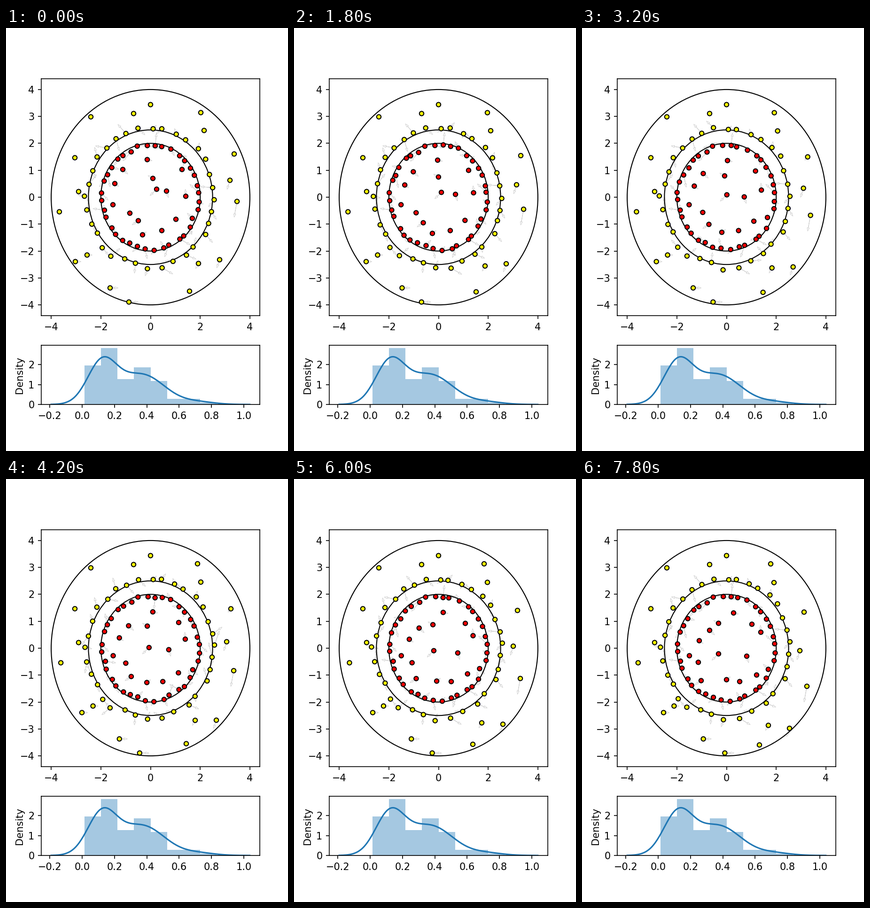
A matplotlib script for the animation above (8 s loop, 600x900 px).

```python
import numpy as np
import matplotlib.pyplot as plt
from matplotlib.animation import FuncAnimation
from matplotlib.collections import PolyCollection

FRAMES = 40
STEP = 0.055          # arrows show displacement per frame / STEP
UNIT = np.array([465 / 8.8, -504 / 8.8])   # pixels per data unit
rng = np.random.default_rng(4)


def ring(n, first, radius, spread):
    """Evenly spaced cells, pressed loosely against one side of a wall."""
    angle = first - 2 * np.pi * np.arange(n) / n + rng.normal(0, 0.02, n)
    return angle, radius + spread * np.abs(rng.normal(0, 1, n))


def polar(angle, radius):
    return np.column_stack([radius * np.cos(angle), radius * np.sin(angle)])


def flow(pos):
    """Drift of the outer cells over a loop: down on the right, inwards below."""
    x, y = (pos * UNIT).T
    dx = np.where(x > 0, -13, 0.19 * np.maximum(y, 0))
    dy = 0.45 * np.maximum(x, 0) * np.exp(-((y - 50) / 110) ** 2)
    return np.column_stack([dx, dy]) / UNIT


# loose inner cells: offset from the centre and drift over a loop, in pixels
inner = np.array([
    (-7, -80, 22, 5), (5, -40, -22, -13), (13, -17, -30, 29), (34, -13, 9, 30),
    (67, -59, -13, 8), (75, -2, -2, -32), (54, 47, 10, 10), (24, 71, 4, 0),
    (-17, 80, 17, -13), (-26, 50, -28, 19), (-44, 34, -16, -4), (-80, 16, 1, 0),
    (-76, -29, 18, 13), (-59, -59, 23, 21)])
# loose outer cells: offset only, the flow moves them
outer = np.array([
    (0, -197), (107, -180), (114, -142), (178, -92), (169, -36), (184, 9),
    (147, 133), (83, 200), (102, 141), (-46, 223), (-86, 193), (-160, 137),
    (-135, 123), (-194, 31), (-153, -12), (-161, -84), (-127, -171),
    (-36, -178)]) / UNIT

red_angle, red_radius = ring(36, np.radians(94.6), 1.98, -0.06)
yel_angle, yel_radius = ring(32, np.radians(89), 2.51, 0.09)
red_ring = polar(red_angle, red_radius)
yel_ring = polar(yel_angle, yel_radius)
# the right side of the yellow ring creeps upwards
yel_turn = 0.13 * np.maximum(np.cos(yel_angle), 0)

start = np.vstack([red_ring, inner[:, :2] / UNIT, yel_ring, outer])
drift = np.vstack([np.zeros_like(red_ring), inner[:, 2:] / UNIT,
                   polar(yel_angle + yel_turn, yel_radius) - yel_ring,
                   flow(outer)])
count = len(start)
is_red = np.arange(count) < len(red_ring) + len(inner)
low = np.where(is_red, 0.0, 2.5)
high = np.where(is_red, 2.0, 4.0)

# ring cells bounce to and fro
on_ring = np.repeat([1, 0, 1, 0],
                    [len(red_ring), len(inner), len(yel_ring), len(outer)])
bounce = 0.05 * on_ring[:, None] * polar(rng.uniform(0, 2 * np.pi, count), 1)
cycles = rng.integers(2, 6, count)


def path(i):
    t = i / (FRAMES - 1)
    swing = 2 / np.pi * np.arcsin(np.sin(2 * np.pi * cycles * t))
    return start + drift * t + bounce * swing[:, None]


def keep_inside(pos):
    r = np.hypot(*pos.T)
    return pos * (np.clip(r, low, high) / r)[:, None]


def arrow_shapes(pos, vel):
    """Thin shaft with a small hollow head, sized in pixels."""
    tail, shift = pos * UNIT, vel * UNIT
    length = np.hypot(*shift.T)[:, None] + 1e-9
    along = shift / length
    side = along[:, ::-1] * [-1, 1] * 2.3
    tip = tail + shift
    neck = tip - along * np.minimum(7, length)
    shape = np.stack([tail, neck, neck + side, tip, neck - side, neck], axis=1)
    return shape / UNIT


fig, (ax, dist) = plt.subplots(
    2, 1, figsize=(4, 6), dpi=150, gridspec_kw={"height_ratios": [4, 1]})

ax.set(xlim=(-4.4, 4.4), ylim=(-4.4, 4.4),
       xticks=range(-4, 5, 2), yticks=range(-4, 5))
for r in (2, 2.5, 4):
    ax.add_patch(plt.Circle((0, 0), r, fill=False))
arrows = PolyCollection([], facecolors="white", edgecolors="lightgray",
                        linewidths=0.5, zorder=0.5)
ax.add_collection(arrows, autolim=False)
cells = ax.scatter(*start.T, s=20, c=np.where(is_red, "red", "yellow"),
                   edgecolors="black", linewidths=1, zorder=2)

# speed distribution: histogram with its smooth density
WIDTH = 0.1022
bins = np.array([20, 29, 13, 19, 12, 3, 3, 1])
dist.bar(0.0145 + WIDTH * np.arange(len(bins)), bins / (bins.sum() * WIDTH),
         WIDTH, align="edge", color="#1f77b4", alpha=0.4)
x = np.linspace(-0.1915, 1.037, 200)
density = sum(h * np.exp(-((x - m) / s) ** 2 / 2) for h, m, s in
              [(2.05, 0.122, 0.09), (1.5, 0.37, 0.14), (0.12, 0.72, 0.1)])
dist.plot(x, density, color="#1f77b4")
dist.set(xlim=(-0.253, 1.099), ylim=(0, 2.975), ylabel="Density",
         xticks=np.arange(-0.2, 1.1, 0.2), yticks=[0, 1, 2])


def draw(i):
    pos = keep_inside(path(i))
    cells.set_offsets(pos)
    arrows.set_verts(arrow_shapes(pos, (path(i + 0.5) - path(i - 0.5)) / STEP))
    return cells, arrows


anim = FuncAnimation(fig, draw, frames=FRAMES, interval=200, repeat=True)
plt.show()
```
